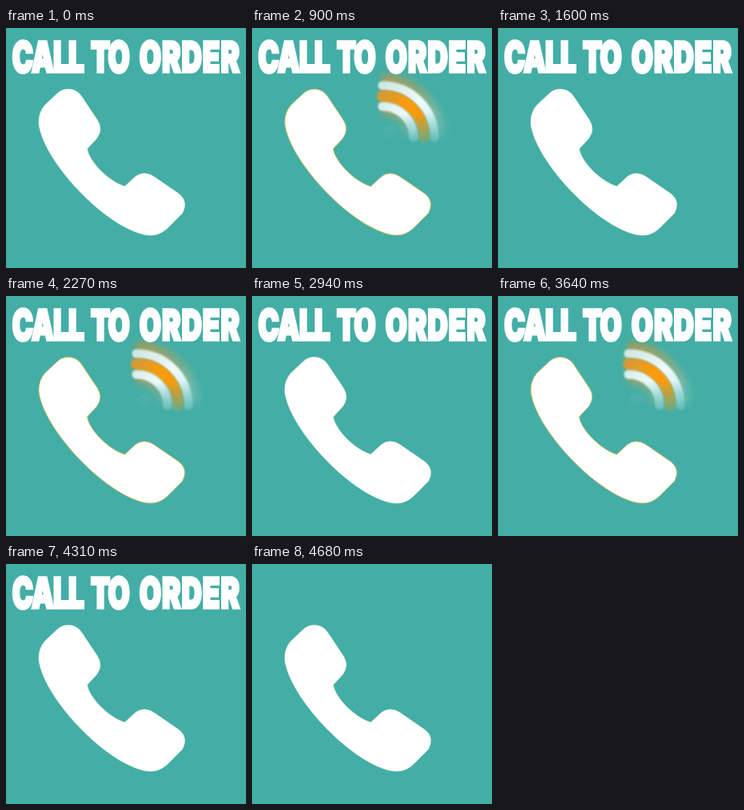
Recreate the animation shown at these times as an HTML page. Size 300 px wide and 300 px high, loop 5010 ms.

```html
<!DOCTYPE html>
<html lang="en">
<head>
<meta charset="utf-8">
<title>Call to order</title>
<style>
html, body { margin: 0; width: 100%; height: 100%; overflow: hidden; background: #43aea6; }
svg { display: block; width: 100vw; height: 100vh; }
text { font: 900 52px Inter, Roboto, sans-serif; fill: #fff; stroke: #fff; stroke-width: 3.5px; }
</style>
</head>
<body>
<svg viewBox="0 0 300 300">
  <defs>
    <filter id="soft" x="-50%" y="-50%" width="200%" height="200%"><feGaussianBlur stdDeviation="5"/></filter>
    <filter id="edge" x="-20%" y="-20%" width="140%" height="140%"><feGaussianBlur stdDeviation="1.3"/></filter>
    <linearGradient id="halo" gradientUnits="userSpaceOnUse" x1="155" y1="60" x2="240" y2="130">
      <stop offset="0" stop-color="#d4902c" stop-opacity=".85"/>
      <stop offset=".5" stop-color="#b0a566" stop-opacity=".65"/>
      <stop offset="1" stop-color="#8fd0ca" stop-opacity=".6"/>
    </linearGradient>
    <linearGradient id="pale" gradientUnits="userSpaceOnUse" x1="160" y1="75" x2="225" y2="140">
      <stop offset="0" stop-color="#cfe8e2"/>
      <stop offset=".5" stop-color="#f0fbfc"/>
      <stop offset="1" stop-color="#c4eaea"/>
    </linearGradient>
    <linearGradient id="amber" gradientUnits="userSpaceOnUse" x1="160" y1="80" x2="220" y2="140">
      <stop offset="0" stop-color="#cf9a3c"/>
      <stop offset=".4" stop-color="#fb9b0a"/>
      <stop offset="1" stop-color="#f79c10"/>
    </linearGradient>
    <linearGradient id="fall" gradientUnits="userSpaceOnUse" x1="0" y1="106" x2="0" y2="146">
      <stop offset="0" stop-color="#fff"/>
      <stop offset="1" stop-color="#fff" stop-opacity=".15"/>
    </linearGradient>
    <mask id="fade" maskUnits="userSpaceOnUse" x="0" y="0" width="300" height="300">
      <rect width="300" height="300" fill="url(#fall)"/>
    </mask>
  </defs>
  <rect width="300" height="300" fill="#43aea6"/>
  <g id="waves" mask="url(#fade)"></g>
  <path id="phone" fill="#fff" stroke-width="0.8" d="M48.500 96.500 L64.500 81.500 Q70 76.500 78 76.500 Q88.500 76.500 94.500 85.500 L114.500 115.500 Q121.500 127 113.500 138 L101.500 151 C103.500 167 129 192.500 148.500 198 L161.500 186 Q172 178 184.500 185.500 L216.500 207.500 Q228 217 220.500 231.500 L202.500 249.500 C193 258.500 184 260.500 172 258 C120 245.500 45.500 164 41 119 Q40.500 106 48.500 96.500 Z"/>
  <g id="title">
    <text transform="translate(7.700 54.800) scale(.675 1)" letter-spacing="-1.2">CALL</text>
    <text transform="translate(106 54.800) scale(.675 1)" letter-spacing="-2">TO</text>
    <text transform="translate(166.800 54.800) scale(.675 1)" letter-spacing="1.5">ORDER</text>
  </g>
</svg>
<script>
const LOOP = 5010, TITLE_END = 4680;
const RINGS = [[900, 1600], [2270, 2940], [3640, 4310]];
const $ = id => document.getElementById(id);
const waves = $('waves'), phone = $('phone'), title = $('title');

function add(tag, attrs) {
  const el = document.createElementNS('http://www.w3.org/2000/svg', tag);
  for (const k in attrs) el.setAttribute(k, attrs[k]);
  waves.append(el);
}

// quarter ring around the earpiece
function arc(r, paint, width, filter, cap = 'round') {
  add('path', {
    d: `M163 ${137 - r} A${r} ${r} 0 0 1 ${163 + r} 137`, fill: 'none',
    stroke: `url(#${paint})`, 'stroke-width': width, 'stroke-linecap': cap, filter: `url(#${filter})`
  });
}

arc(60, 'halo', 38, 'soft', 'butt');
arc(38, 'halo', 22, 'soft', 'butt');
arc(65, 'pale', 11, 'edge');
arc(52, 'amber', 14, 'edge');
arc(39, 'pale', 11, 'edge');
add('circle', { cx: 173, cy: 130, r: 9, fill: '#5db7af', opacity: 0.6, filter: 'url(#edge)' });

function draw(t) {
  const ring = RINGS.some(([a, b]) => t >= a && t < b);
  waves.style.display = ring ? '' : 'none';
  phone.setAttribute('stroke', ring ? '#e0b84a' : '#eef0dc');
  title.style.display = t < TITLE_END ? '' : 'none';
}

const start = performance.now();
function tick() {
  draw((performance.now() - start) % LOOP);
  requestAnimationFrame(tick);
}
draw(0);
requestAnimationFrame(tick);
</script>
</body>
</html>
```
